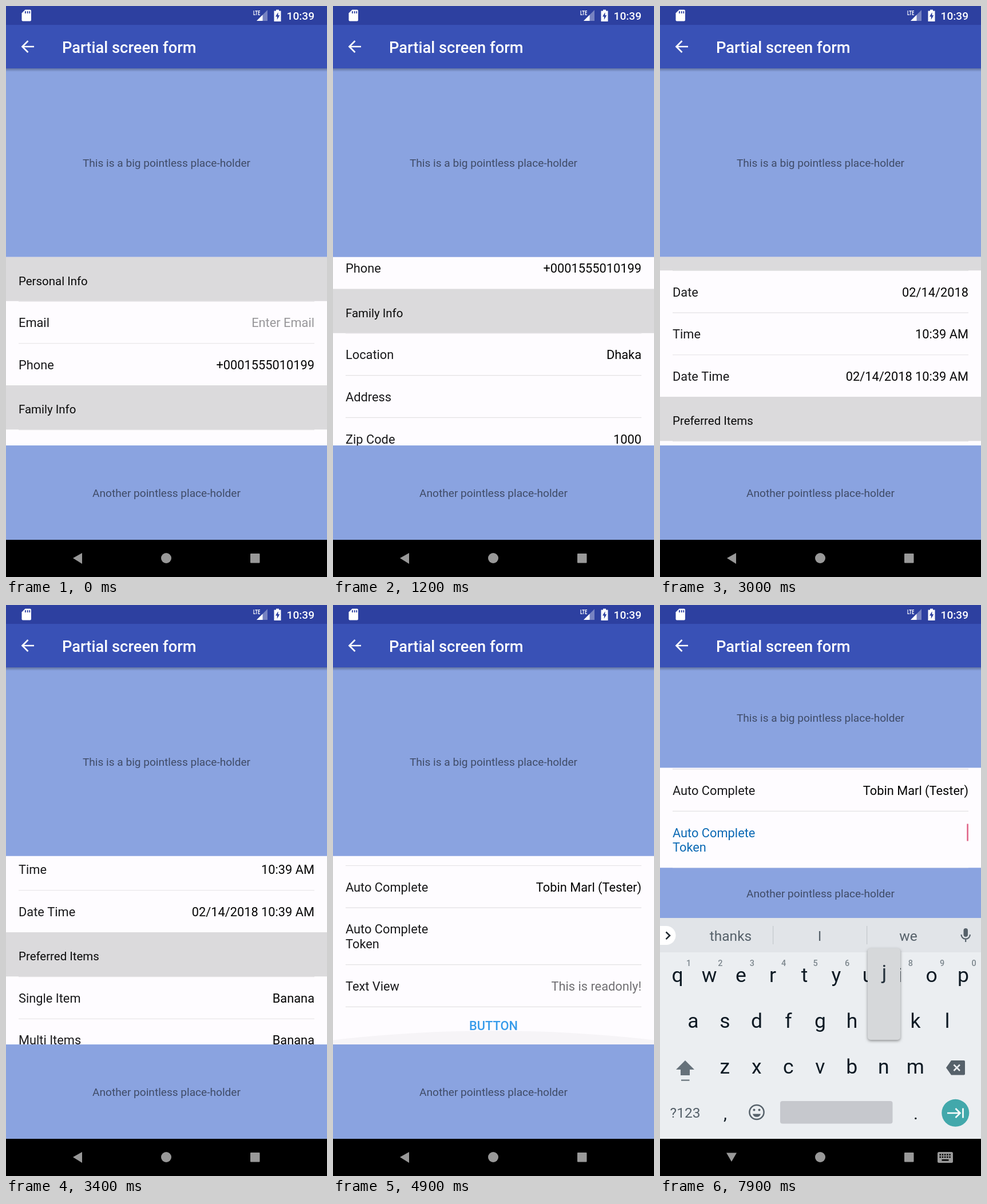
An HTML page with a canvas that plays this animation: 561x998 px, repeating every 8000 ms.

```html
<!DOCTYPE html>
<html lang="en">
<head>
<meta charset="utf-8">
<title>Partial screen form</title>
<style>
html, body { margin: 0; width: 100%; height: 100%; overflow: hidden; background: #000; }
canvas { display: block; }
</style>
</head>
<body>
<canvas id="stage" width="561" height="998"></canvas>
<script>
const ctx = document.getElementById('stage').getContext('2d');
const W = 561, LOOP = 8000, BAR = 109, NAV = 933, KEYS = 547;
const LEFT = 22, RIGHT = 539, HEADER_H = 77.2, ROW_H = 73.65;
const BLUE = '#8aa3e0', PAPER = '#fefcff', INK = '#19191b', GREY = '#999';

const items = [
  { header: 'Personal Info' },
  { label: 'Email', value: 'Enter Email', color: '#98979a' },
  { label: 'Phone', value: '+0001555010199' },
  { header: 'Family Info' },
  { label: 'Location', value: 'Dhaka' },
  { label: 'Address' },
  { label: 'Zip Code', value: '1000' },
  { header: 'Schedule' },
  { label: 'Date', value: '02/14/2018' },
  { label: 'Time', value: '10:39 AM' },
  { label: 'Date Time', value: '02/14/2018 10:39 AM' },
  { header: 'Preferred Items' },
  { label: 'Single Item', value: 'Banana' },
  { label: 'Multi Items', value: 'Banana' },
  { label: 'Auto Complete', value: 'Tobin Marl (Tester)' },
  { label: 'Auto Complete', second: 'Token', height: 99.5 },
  { label: 'Text View', value: 'This is readonly!', color: '#717073' },
  { button: 'BUTTON', height: 66.2 },
];

// Swipes: start, end, distance
const swipes = [
  [400, 1200, 168.6], [1600, 1900, 130], [2000, 2200, 83.6], [2300, 2500, 38],
  [2700, 3600, 281], [3700, 4000, 40], [4100, 4700, 287.5],
];

const clamp = x => Math.max(0, Math.min(1, x));
const easeOut = x => 1 - (1 - x) ** 2;
const scrollAt = t => swipes.reduce((sum, [a, b, d]) => sum + d * easeOut(clamp((t - a) / (b - a))), 0);

function rect(x, y, w, h, color, radius = 0) {
  ctx.fillStyle = color;
  ctx.beginPath();
  ctx.roundRect(x, y, w, h, radius);
  ctx.fill();
}
function circle(x, y, r, color) {
  ctx.fillStyle = color;
  ctx.beginPath();
  ctx.arc(x, y, r, 0, 7);
  ctx.fill();
}
function fillPath(d, color) {
  ctx.fillStyle = color;
  ctx.fill(new Path2D(d));
}
function strokePath(d, color, width) {
  ctx.strokeStyle = color;
  ctx.lineWidth = width;
  ctx.stroke(new Path2D(d));
}
function text(s, x, y, size, color, align = 'left', weight = 400) {
  ctx.font = `${weight} ${size}px Roboto, sans-serif`;
  ctx.textAlign = align;
  ctx.fillStyle = color;
  ctx.fillText(s, x, y);
}

function drawBars() {
  const shadow = ctx.createLinearGradient(0, BAR, 0, BAR + 6);
  shadow.addColorStop(0, 'rgba(0,0,0,.28)');
  shadow.addColorStop(1, 'rgba(0,0,0,0)');
  rect(0, BAR, W, 6, shadow);
  rect(0, 0, W, 33, '#2d40a0');
  rect(0, 33, W, BAR - 33, '#3951b6');

  fillPath('M33.5 6.5H42a2 2 0 0 1 2 2V24.500a2 2 0 0 1-2 2H29.500a2 2 0 0 1-2-2V12.500z', '#fff');
  for (const x of [33, 36.8, 40.4]) rect(x, 9, 1.8, 4, '#2d40a0');
  ctx.save();
  ctx.font = '700 11px Roboto, sans-serif';
  ctx.translate(432, 16);
  ctx.scale(.68, 1);
  ctx.fillStyle = '#fff';
  ctx.textAlign = 'left';
  ctx.fillText('LTE', 0, 0);
  ctx.restore();
  fillPath('M457 7V26H438z', 'rgba(255,255,255,.35)');
  fillPath('M448.500 15.500V26H438z', '#fff');
  fillPath('M472 6.500h5v2h3.500v18.500h-12v-18.500h3.500z', '#fff');
  fillPath('M475.500 11l-4.500 7.500h2.800v5.500l4.500-7.800h-2.800z', '#2d40a0');
  text('10:39', RIGHT, 24, 19.1, '#fff', 'right', 500);

  strokePath('M49 71H29M38.500 61L28.500 71L38.500 81', '#fff', 2.7);
  text('Partial screen form', 98, 81.5, 27.3, '#fff', 'left', 500);
}

function drawItem(item, y, focused, caret) {
  const height = item.height || (item.header ? HEADER_H : ROW_H);
  if (item.header) {
    rect(0, y, W, height, '#dbdadc');
    text(item.header, LEFT, y + 49.3, 20.46, '#0a0a0a');
    return height;
  }
  rect(LEFT, y - .3, RIGHT - LEFT, 1.2, '#e3e2e4');
  if (item.button) text(item.button, W / 2, y + 41.3, 21.8, '#369bea', 'center', 500);
  else {
    const color = item.second && focused ? '#0b69b4' : INK;
    text(item.label, LEFT, y + 45.5, 21.8, color);
    if (item.second) {
      text(item.second, LEFT, y + 71.1, 21.8, color);
      if (caret) rect(536.3, y + 22.3, 2.6, 30, '#e0668a');
    }
    if (item.value) text(item.value, RIGHT, y + 45.5, 21.8, item.color || '#050505', 'right');
  }
  return height;
}

function drawGlow(t, bottom) {
  const depth = Math.min(24 + (t - 4900) * .17, 58 * (5700 - t) / 600);
  if (t < 4900 || depth <= 0) return;
  const ry = 673 * depth / 90;
  ctx.fillStyle = `rgba(0,0,0,${depth * .00125})`;
  ctx.beginPath();
  ctx.ellipse(W / 2, bottom - depth + ry, 673, ry, 0, 0, 7);
  ctx.fill();
}

function drawForm(t, resized) {
  const bottom = resized ? KEYS : NAV;
  const unit = (bottom - BAR) / 5;
  const top = BAR + unit * 2, end = BAR + unit * 4;
  rect(0, BAR, W, bottom - BAR, BLUE);
  text('This is a big pointless place-holder', W / 2, BAR + unit + 7.3, 19.1, '#3f4b67', 'center');
  text('Another pointless place-holder', W / 2, end + unit / 2 + 7.3, 19.1, '#3f4b67', 'center');

  ctx.save();
  ctx.beginPath();
  ctx.rect(0, top, W, end - top);
  ctx.clip();
  rect(0, top, W, end - top, PAPER);
  const focused = t >= 6600;
  const caret = focused && (t - 6600) % 1000 < 500;
  let y = top - (resized ? 1043 : scrollAt(t));
  for (const item of items) y += drawItem(item, y, focused, caret);
  drawGlow(t, end);
  ctx.restore();
}

function drawKeyRow(letters, x, baseline) {
  [...letters].forEach((c, i) => text(c, x + 55.5 * i, baseline, 35.5, '#0e1a24', 'center'));
}

function drawKeyboard(pressed) {
  const dim = '#56616a';
  rect(0, KEYS, W, 500, '#ebeef1');
  rect(0, KEYS, W, 60, '#e1e4e8');
  rect(-20, 561, 47.5, 33, '#fff', 16.5);
  strokePath('M10.500 571.500l6.500 6.300l-6.500 6.300', '#222b32', 2.6);
  text('thanks', 123.5, 587, 24.5, dim, 'center');
  text('I', 279, 587, 24.5, dim, 'center');
  text('we', 434, 587, 24.5, dim, 'center');
  for (const x of [197, 361]) rect(x, 561, 1.2, 32, '#c3c8cc');
  rect(530.5, 565, 7.500, 15, dim, 3.75);
  strokePath('M526.500 576a7.700 7.700 0 0 0 15.400 0M534.200 583.500V589', dim, 2.2);

  drawKeyRow('qwertyuiop', 30.5, 659);
  drawKeyRow('asdfghjkl', 58, 739);
  drawKeyRow('zxcvbnm', 113.3, 819);
  [...'1234567890'].forEach((c, i) => text(c, 50 + 55.4 * i, 631, 14.5, '#7c868d', 'center', 500));

  fillPath('M44 796L60 812H52V822H36V812H28z', '#66717a');
  rect(37, 829.5, 14.5, 2.2, '#66717a');
  fillPath('M509 796H531a2 2 0 0 1 2 2V819.500a2 2 0 0 1-2 2H509L500 808.700z', dim);
  strokePath('M513.500 803.500l10.500 10.500M524 803.500l-10.500 10.500', '#ebeef1', 2.6);

  text('?123', 44, 896, 24.5, dim, 'center');
  text(',', 114, 899, 30, '#0e1a24', 'center');
  text('.', 447, 899, 30, '#0e1a24', 'center');
  strokePath('M181.600 886.500a12.600 12.600 0 1 0-25.200 0a12.600 12.600 0 1 0 25.200 0z', dim, 2.5);
  circle(164.5, 882.5, 2, dim);
  circle(173.5, 882.5, 2, dim);
  fillPath('M162 889.500H176a7.300 7.300 0 0 1-14 0z', dim);
  rect(210, 867, 196.5, 39.5, '#c6c8cd', 4);
  circle(516.3, 887.8, 24, '#42a8ab');
  strokePath('M502 888H524M516.500 880l8 8l-8 8M529.500 879.500V896.500', '#fff', 2.6);

  if (pressed) {
    ctx.save();
    ctx.shadowColor = 'rgba(0,0,0,.4)';
    ctx.shadowBlur = 5;
    ctx.shadowOffsetY = 2;
    rect(363, 600, 57, 160, '#d6d8da', 5);
    ctx.restore();
    text('j', 392, 654, 35.5, '#26323d', 'center');
  }
}

function drawNav(typing) {
  rect(0, NAV, W, 65, '#000');
  fillPath(typing ? 'M116 957.500H134L125 973z' : 'M117 965L133 956V975z', GREY);
  circle(280, 965, 9, GREY);
  rect(427, 957, 16.5, 16.5, GREY, 1);
  if (!typing) return;
  rect(485, 956, 27, 19, GREY, 2.5);
  for (let i = 0; i < 10; i++) rect(488.5 + i % 5 * 4.2, 959.5 + 4.2 * (i / 5 | 0), 2.5, 2.5, '#000');
  rect(492.5, 969, 12, 2.5, '#000');
}

function render(now) {
  const t = Math.floor(now % LOOP / 100) * 100;
  const typing = t >= 6700;
  rect(0, 0, W, 998, '#fafafa');
  drawForm(t, typing);
  drawBars();
  if (typing) {
    const shown = easeOut(clamp((t - 6600) / 300));
    ctx.save();
    ctx.globalAlpha = shown;
    ctx.translate(0, 80 * (1 - shown));
    drawKeyboard(t >= 7900);
    ctx.restore();
  }
  drawNav(typing);
}

const start = performance.now();
function tick() {
  render(performance.now() - start);
  requestAnimationFrame(tick);
}
tick();
</script>
</body>
</html>
```
